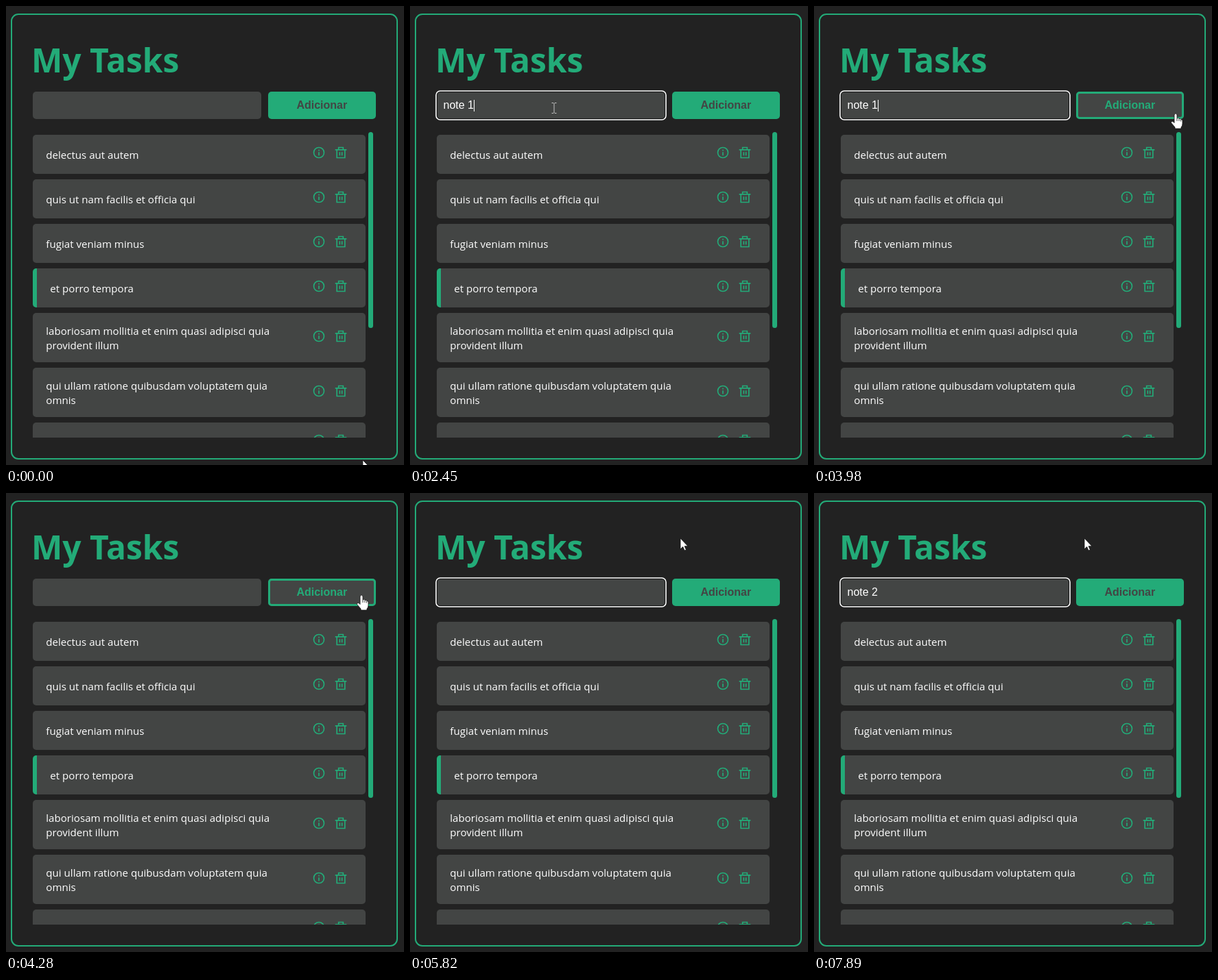
An HTML page that plays this animation: 580 by 670 pixels, repeating every 8 s.

```html
<!DOCTYPE html>
<html lang="pt">
<head>
<meta charset="utf-8">
<title>My Tasks</title>
<style>
  html, body { margin: 0; width: 100%; height: 100%; overflow: hidden; background: #222; }
  svg { display: block; }
  .task { font: 15.1px "Open Sans", sans-serif; fill: #fff; }
  .form { font: 16px "Liberation Sans", sans-serif; fill: #fff; white-space: pre; }
  .title { font: bold 48px "Open Sans", sans-serif; fill: #23ab78; }
  .icon { fill: none; stroke: #23ab78; stroke-width: 2; }
</style>
</head>
<body>
<svg width="580" height="670">
  <defs>
    <g id="icons" class="icon">
      <g transform="translate(446 -10) scale(.8333)">
        <circle cx="12" cy="12" r="9"/>
        <path d="M12 7v2M12 11v6"/>
      </g>
      <path transform="translate(478 -10) scale(.8333)"
        d="M2 7H22M5 8V21H19V8M8 6V3H16V6M10 11v6M14 11v6"/>
    </g>
  </defs>
  <rect x="8" y="12" width="562" height="649" rx="10" fill="none" stroke="#23ab78" stroke-width="2"/>
  <text class="title" x="37" y="97">My Tasks</text>

  <rect x="39" y="125" width="333" height="40" rx="5" fill="#434544"/>
  <g id="ring" fill="none">
    <rect x="39.5" y="125.5" width="332" height="39" rx="4.5" stroke="#151515"/>
    <rect x="38" y="124" width="335" height="42" rx="6" stroke="#fff" stroke-width="1.6"/>
  </g>
  <text id="entry" class="form" x="48.5" y="150"></text>
  <rect id="caret" y="137" width="1" height="17" fill="#fff"/>

  <rect id="button" x="382" y="125" width="157" height="40" rx="5"/>
  <rect id="edge" x="383.5" y="126.5" width="154" height="37" rx="3.5" fill="none" stroke="#23ab78" stroke-width="3"/>
  <text id="label" class="form" x="460.3" y="150" text-anchor="middle" style="font-weight:bold">Adicionar</text>

  <svg id="list" y="184" width="580" height="446" viewBox="0 184 580 446"></svg>
  <rect id="bar" x="528" y="184" width="7" rx="3.5" fill="#23ab78"/>

  <circle id="ripple" r="15" fill="rgba(32,90,110,.35)"/>
  <g id="cursor" fill="#fff" stroke="#111" stroke-width=".8">
    <path id="arrow" d="M0 0V16L3.7 12.5 6 18 8.5 17 6.2 11.7H11Z"/>
    <path id="beam" fill="none" stroke="#c4c4c4" stroke-width="1" d="M-3.5-7.5H-1L0-6.5 1-7.5H3.5M0-6.5V6.5M-3.5 7.5H-1L0 6.5 1 7.5H3.5"/>
    <g id="hand">
      <path d="M-2 2Q0-2.5 2 2V7Q4 5.5 5 7.5 7 6.5 7.6 8.5 10 8 10 10.5V15Q10 18 8 20V22H-1V20L-6.5 13.5Q-6.5 10.5-4 11.5L-2 13.5Z"/>
      <path fill="none" d="M2 7V11M5 8V11M7.6 9V11.5"/>
    </g>
  </g>
</svg>
<script>
const $ = id => document.getElementById(id);
const GREEN = [35, 171, 120], DARK = [67, 69, 68];
const rgb = c => `rgb(${c.map(Math.round)})`;
const clamp = v => Math.max(0, Math.min(1, v));
const show = (id, on) => $(id).style.display = on ? '' : 'none';

// top, height, lines, done
const tasks = [
  [188, 57, ['delectus aut autem']],
  [253, 57, ['quis ut nam facilis et officia qui']],
  [318, 57, ['fugiat veniam minus']],
  [383, 57, ['et porro tempora'], true],
  [448, 72, ['laboriosam mollitia et enim quasi adipisci quia', 'provident illum']],
  [528, 72, ['qui ullam ratione quibusdam voluptatem quia', 'omnis']],
  [608, 57, []]
];
const box = (x, y, w, h, r, fill) =>
  `<rect x="${x}" y="${y}" width="${w}" height="${h}" rx="${r}" fill="${fill}"/>`;
$('list').innerHTML = tasks.map(([y, h, lines, done]) => {
  const tall = h > 60;
  const back = done
    ? box(39, y, 20, h, 5, rgb(GREEN)) + box(45, y, 479, h, 5, rgb(DARK)) + box(45, y, 20, h, 0, rgb(DARK))
    : box(39, y, 485, h, 5, rgb(DARK));
  const text = lines.map((s, i) =>
    `<text class="task" x="${done ? 64.3 : 58.3}" y="${y + (tall ? 32 : 35) + 21 * i}">${s}</text>`).join('');
  return back + text + `<use href="#icons" y="${y + (tall ? 34 : 26)}"/>`;
}).join('');

// time, typed text, caret visible
const typing = [
  [0, '', 0], [470, '', 1], [1000, '', 0], [1500, 'n', 1], [1640, 'no', 1], [1710, 'not', 1],
  [1780, 'note', 1], [1980, 'note ', 1], [2450, 'note 1', 1], [2990, 'note 1', 0], [3540, 'note 1', 1],
  [4100, '', 0], [5290, '', 1], [5820, '', 0], [6340, '', 1], [6510, 'n', 1], [6580, 'no', 1],
  [6720, 'not', 1], [6790, 'note', 1], [7020, 'note ', 1], [7390, 'note 2', 1], [7890, 'note 2', 0]
];
// time, x, y of the pointer
const path = [
  [0, 520, 663], [30, 518, 655], [130, 430, 480], [260, 290, 265], [380, 217, 160], [450, 208, 148],
  [600, 208, 148], [640, 210, 149], [3120, 210, 149], [3220, 350, 172], [3370, 590, 178],
  [3540, 590, 172], [3680, 539, 163], [3820, 527, 157], [4200, 527, 157], [4280, 518, 149],
  [4900, 518, 149], [5130, 381, 140], [5250, 354, 135], [5430, 354, 135], [5560, 380, 90],
  [5690, 394, 66], [8000, 394, 66]
];
const clicks = [470, 4100, 5290];

function pointerAt(t) {
  const i = path.findIndex(p => p[0] > t);
  const [a, b] = [path[i - 1], path[i]];
  const k = (t - a[0]) / (b[0] - a[0]);
  return [a[1] + (b[1] - a[1]) * k, a[2] + (b[2] - a[2]) * k];
}

function draw(t) {
  const [, text, blink] = typing.findLast(e => e[0] <= t);
  $('entry').textContent = text;
  const width = text ? $('entry').getComputedTextLength() : 0;
  $('caret').setAttribute('x', Math.floor(48.9 + width));
  show('caret', blink);
  show('ring', t >= 470 && t < 4100 || t >= 5290);

  const hover = t >= 3680 && t < 5130;
  const fade = clamp((t - 3680) / 300) - clamp((t - 5130) / 300);
  $('button').setAttribute('fill', rgb(GREEN.map((g, i) => g + (DARK[i] - g) * fade)));
  $('label').style.fill = rgb(hover ? GREEN : DARK);
  show('edge', hover);
  $('bar').setAttribute('height', t < 4180 ? 286 : 261);

  const [x, y] = pointerAt(t);
  const inRow = y > 125 && y < 165;
  const shape = inRow && x > 39 && x < 372 ? 'beam' : inRow && x > 382 && x < 539 ? 'hand' : 'arrow';
  for (const id of ['arrow', 'beam', 'hand']) show(id, id === shape);
  $('cursor').setAttribute('transform', `translate(${x} ${y})`);

  const click = clicks.find(c => t >= c && t < c + 160);
  show('ripple', click !== undefined);
  if (click !== undefined) {
    const [cx, cy] = pointerAt(click);
    $('ripple').setAttribute('cx', cx);
    $('ripple').setAttribute('cy', cy);
  }
}

const start = performance.now();
function tick() {
  draw((performance.now() - start) % 8000);
  requestAnimationFrame(tick);
}
tick();
</script>
</body>
</html>
```
